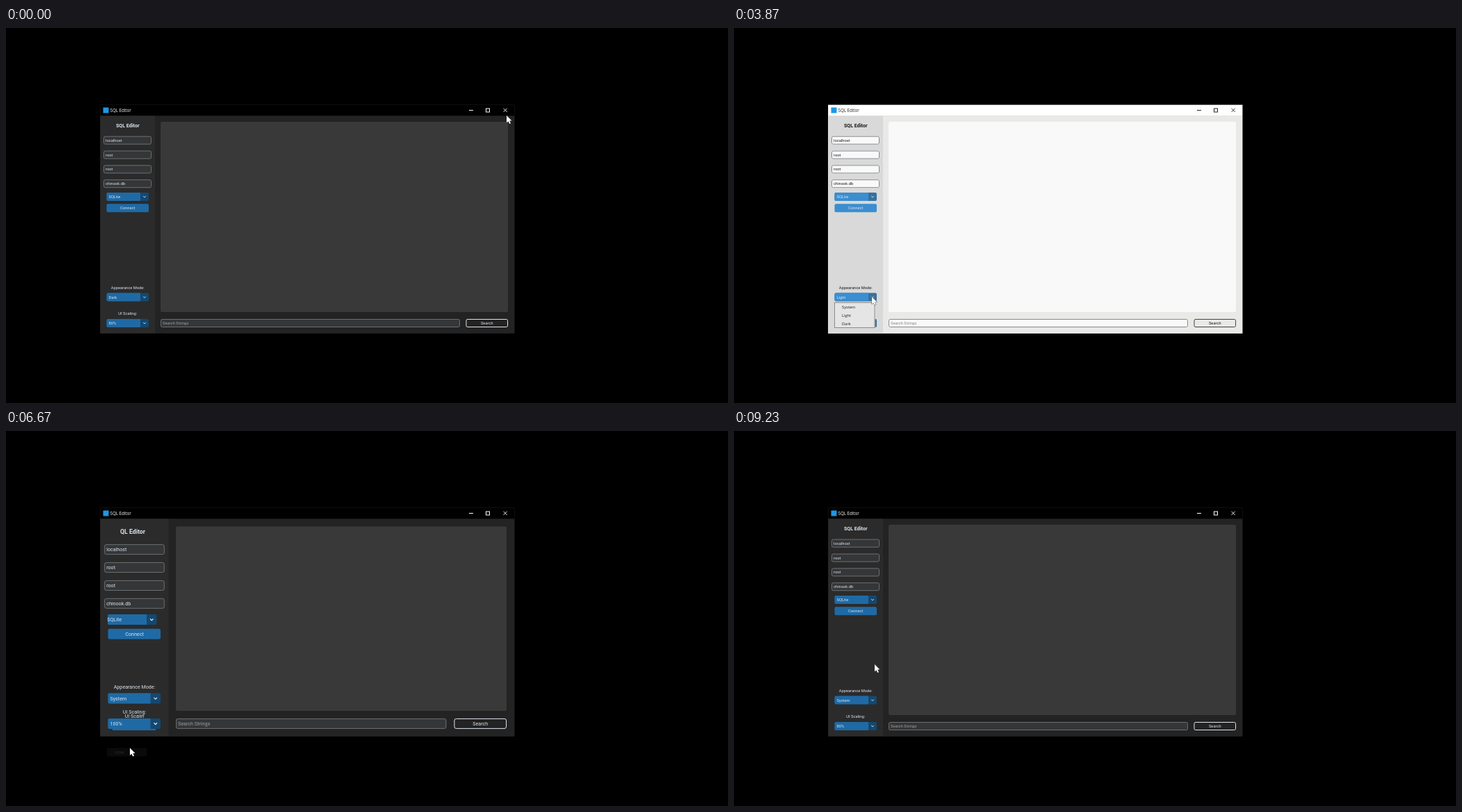
These frames come from a looping animation (1037 px wide and 540 px high, 9260 ms). An HTML page with a canvas:

```html
<!DOCTYPE html>
<html lang="en">
<head>
<meta charset="utf-8">
<title>SQL Editor</title>
<style>
  html, body { margin: 0; width: 100%; height: 100%; overflow: hidden; background: #000; }
  canvas { display: block; }
</style>
</head>
<body>
<canvas id="stage" width="1037" height="540"></canvas>
<script>
const ctx = document.getElementById('stage').getContext('2d');
const LOOP = 9260;

const dark = {
  bar: '#000', barText: '#fff', edge: '#1c1c1c', bg: '#232323', side: '#2b2b2b', panel: '#393939',
  entry: '#343638', border: '#6b6e70', text: '#dce4ee', hint: '#9e9e9e', button: '#1f6aa5',
  arrow: '#144870', outline: '#dce4ee', menu: '#202020', hover: '#383838', menuEdge: '#d8d8d8'
};
const light = {
  bar: '#fff', barText: '#222', edge: '#ccc', bg: '#e9e9e8', side: '#d9d9d9', panel: '#f9f9fa',
  entry: '#f9f9fa', border: '#85898c', text: '#1a1a1a', hint: '#858585', button: '#3b8ed0',
  arrow: '#36719f', outline: '#3e454a', menu: '#e5e5e5', hover: '#bfbfbf', menuEdge: '#8c8c8c'
};

const small = {
  font: 5.75, titleFont: 7.1, h: 12, radius: 2, side: 214, cx: 174.7, title: 141,
  entryX: 140, entryW: 69, entries: [161.7, 182.6, 203.4, 224.2],
  boxX: 144.5, boxW: 60.5, arrowW: 12, driver: 243, connect: 259.2,
  modeLabel: 374, mode: 387.6, scaleLabel: 411.4, scale: 425,
  panel: [222, 135, 499, 274], searchW: 430, findX: 660.5, findW: 60.5,
  item: 12, menuX: 145, menuW: 57, menuText: 155
};
const large = {
  font: 7.15, titleFont: 8.7, h: 15, radius: 2.5, side: 233.5, cx: 184.5, title: 144.6,
  entryX: 141.2, entryW: 86.5, entries: [170.6, 196.5, 222.5, 248.3],
  boxX: 146.5, boxW: 75.5, arrowW: 14.5, driver: 271.6, connect: 292.2,
  modeLabel: 357.5, mode: 375, scaleLabel: 404, scale: 421.4,
  panel: [244, 137.5, 475, 265.5], searchW: 388.5, findX: 643.5, findW: 75.5,
  item: 14.2, menuX: 147, menuW: 64, menuText: 157
};
const resizing = { ...large, modeLabel: 368, mode: 385, partial: true };

const modes = ['System', 'Light', 'Dark'];
const scales = ['80%', '90%', '100%', '110%', '120%'];
const menus = [
  { open: 1130, click: 2470, items: modes, pick: 1, top: 395.5, look: dark, layout: small },
  { open: 3750, click: 4670, items: modes, pick: 0, top: 395.5, look: light, layout: small },
  { open: 5560, click: 6450, items: scales, pick: 2, top: 432.5, look: dark, layout: small },
  { open: 7480, click: 8400, items: scales, pick: 0, top: 431, look: dark, layout: large }
];
const FADE = 270;

// time, x, y of the pointer tip
const pointerPath = [
  [0, 719, 126], [90, 719, 126], [850, 195, 405], [1060, 198, 385], [1250, 196, 389],
  [1850, 163, 410], [1900, 162, 411], [2720, 162, 411], [3300, 196, 392], [3850, 198, 387],
  [4350, 180, 404], [4850, 180, 404], [5350, 199, 423], [5650, 198, 425],
  [6250, 178, 456.5], [6750, 178, 456.5], [7250, 212, 420], [7600, 212, 421],
  [8050, 193, 437.5], [8550, 193, 437.5], [9230, 202, 336], [9260, 202, 336]
];

function pointerAt(t) {
  const i = pointerPath.findIndex(p => p[0] > t);
  const [t0, x0, y0] = pointerPath[i - 1], [t1, x1, y1] = pointerPath[i];
  const u = (t - t0) / (t1 - t0), k = u * u * (3 - 2 * u);
  return [x0 + (x1 - x0) * k, y0 + (y1 - y0) * k];
}

function rect(x, y, w, h, color) {
  ctx.fillStyle = color;
  ctx.fillRect(x, y, w, h);
}

function box(x, y, w, h, r, fill, stroke) {
  ctx.beginPath();
  ctx.roundRect(x, y, w, h, r);
  ctx.fillStyle = fill;
  ctx.fill();
  if (!stroke) return;
  ctx.strokeStyle = stroke;
  ctx.lineWidth = 1;
  ctx.beginPath();
  ctx.roundRect(x + .5, y + .5, w - 1, h - 1, r);
  ctx.stroke();
}

function text(str, x, y, size, color, align = 'left', font = 'Roboto, sans-serif', weight = 400) {
  ctx.font = `${weight} ${size}px ${font}`;
  ctx.textAlign = align;
  ctx.fillStyle = color;
  ctx.fillText(str, x, y + size * .35);
}

function line(points, color, width = 1) {
  ctx.beginPath();
  points.forEach(([x, y]) => ctx.lineTo(x, y));
  ctx.strokeStyle = color;
  ctx.lineWidth = width;
  ctx.stroke();
}

function drawFrame(c) {
  rect(135, 110.5, 595.5, 329.5, c.edge);
  rect(135.5, 111, 594.5, 15.5, c.bar);
  rect(135.5, 126.5, 594.5, 313, c.bg);
  rect(139.5, 114.5, 8, 8, '#1b98e8');
  text('SQL Editor', 149.5, 118.9, 6.2, c.barText, 'left', '"Open Sans", sans-serif');
  line([[665, 118.5], [671, 118.5]], c.barText);
  ctx.strokeRect(689.5, 116, 5, 5);
  line([[714.5, 115.8], [719.7, 121]], c.barText, .9);
  line([[719.7, 115.8], [714.5, 121]], c.barText, .9);
}

function dropdown(label, y, c, L, x = L.boxX, w = L.boxW, inset = 3) {
  const top = y - L.h / 2, split = x + w - L.arrowW, mid = x + w - L.arrowW / 2;
  box(x, top, w, L.h, L.radius, c.arrow);
  box(x, top, w - L.arrowW, L.h, [L.radius, 0, 0, L.radius], c.button);
  text(label, x + inset, y, L.font, '#dce4ee');
  const a = L.h * .15;
  line([[mid - a, y - a / 2], [mid, y + a / 2], [mid + a, y - a / 2]], '#dce4ee', L.h / 12);
}

function drawWidgets(c, L, mode, scale) {
  const label = (s, y) => text(s, L.cx, y, L.font, c.text, 'center');
  rect(135.5, 126.5, L.side - 135.5, 313, c.side);
  text(L.partial ? 'QL Editor' : 'SQL Editor', L.cx - (L.partial ? 2.5 : 0), L.title,
    L.titleFont, c.text, 'center', 'Roboto, sans-serif', 700);

  ['localhost', 'root', 'root', 'chinook.db'].forEach((s, i) => {
    box(L.entryX, L.entries[i] - L.h / 2, L.entryW, L.h, L.radius, c.entry, c.border);
    text(s, L.entryX + 3, L.entries[i], L.font, c.text);
  });

  if (L.partial) {
    dropdown('SQLite', L.driver, c, L, 146, 70.5, -.8);
    text('UI Scalin', L.cx, 410, L.font, c.text, 'center');
    rect(150, 397, 70, 11, c.side);
    rect(153, 428, 62, 3, c.button);
  } else {
    dropdown('SQLite', L.driver, c, L);
  }
  box(L.boxX, L.connect - L.h / 2, L.boxW, L.h, L.radius, c.button);
  text('Connect', L.cx, L.connect, L.font, '#dce4ee', 'center');
  label('Appearance Mode:', L.modeLabel);
  dropdown(mode, L.mode, c, L);
  label('UI Scaling:', L.scaleLabel);
  dropdown(scale, L.scale, c, L);

  const [px, py, pw, ph] = L.panel, top = L.scale - L.h / 2;
  box(px, py, pw, ph, 2, c.panel);
  box(px, top, L.searchW, L.h, L.radius, c.entry, c.border);
  text('Search Strings', px + 3, L.scale, L.font, c.hint);
  box(L.findX, top, L.findW, L.h, L.radius, c.bg, c.outline);
  text('Search', L.findX + L.findW / 2, L.scale, L.font, c.text, 'center');
}

function drawMenu(m, t, pointerY) {
  if (t < m.open || t >= m.click + FADE) return;
  const { layout: L, look: c, top } = m, picked = t >= m.click;
  const hovered = picked ? m.pick : Math.floor((pointerY + 1 - top) / L.item);
  ctx.globalAlpha = picked ? 1 - (t - m.click) / FADE : Math.min(1, (t - m.open + 30) / 150);
  if (!picked) {
    const h = L.item * m.items.length;
    box(L.menuX - .5, top - .5, L.menuW + 1, h + 1, 0, c.menu);
    ctx.strokeStyle = c.menuEdge;
    ctx.lineWidth = 1;
    ctx.strokeRect(L.menuX - .5, top, L.menuW + .5, h);
  }
  m.items.forEach((s, i) => {
    if (picked && i !== m.pick) return;
    const y = top + i * L.item;
    if (i === hovered) rect(L.menuX, y, L.menuW, L.item, c.hover);
    text(s, L.menuText, y + L.item / 2, L.font, c.text, 'left', '"Open Sans", sans-serif');
  });
  ctx.globalAlpha = 1;
}

function drawPointer(x, y) {
  const shape = [[0, 0], [0, 10.5], [2.4, 8.3], [4.1, 12], [5.9, 11.2], [4.3, 7.6], [7.4, 7.4]];
  ctx.beginPath();
  shape.forEach(([dx, dy]) => ctx.lineTo(x + dx, y + dy));
  ctx.closePath();
  ctx.strokeStyle = '#222';
  ctx.lineWidth = .8;
  ctx.stroke();
  ctx.fillStyle = '#fff';
  ctx.fill();
}

function draw(t) {
  const between = (a, b) => t >= a && t < b;
  const look = between(2500, 4700) ? light : dark;
  const layout = between(6600, 6740) ? resizing : between(6740, 8500) ? large : small;
  const mode = t < 2500 ? 'Dark' : t < 4700 ? 'Light' : 'System';
  const blank = between(2500, 2600) || between(4700, 4830);
  const [x, y] = pointerAt(t);

  rect(0, 0, 1037, 540, '#000');
  drawFrame(look);
  if (!blank) drawWidgets(look, layout, mode, between(6500, 8500) ? '100%' : '80%');
  menus.forEach(m => drawMenu(m, t, y));
  drawPointer(x, y);
}

const start = performance.now();
function tick() {
  draw((performance.now() - start) % LOOP);
  requestAnimationFrame(tick);
}
tick();
</script>
</body>
</html>
```
